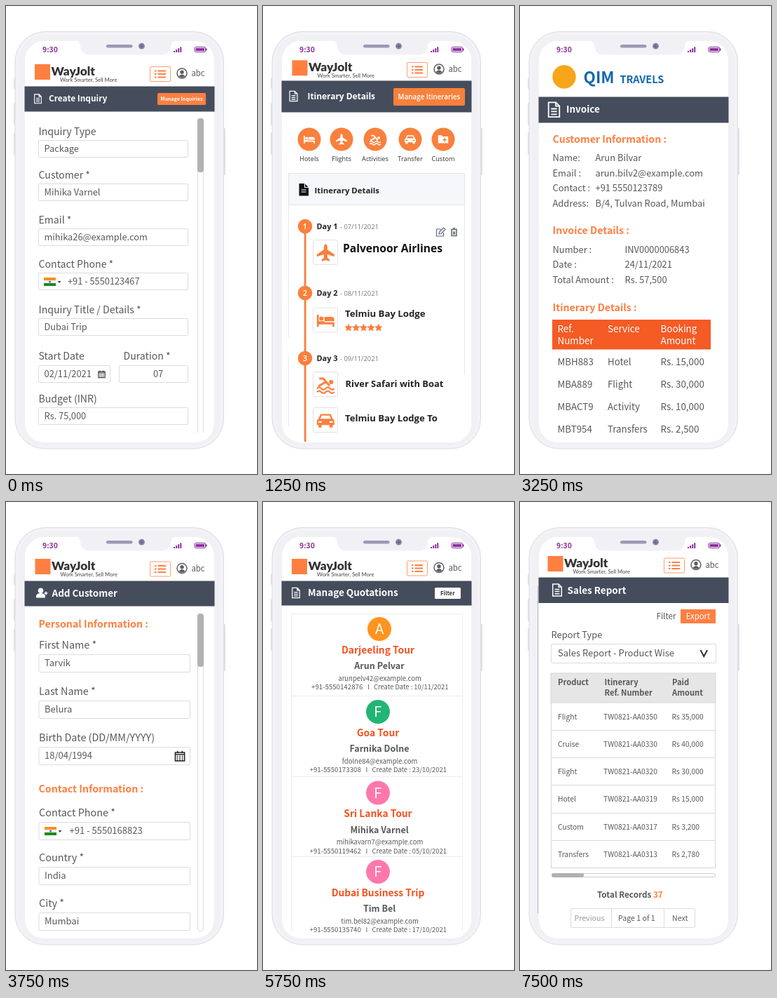
An HTML page that plays this animation: 358 px wide and 667 px high, repeating every 8.75 s.

```html
<!DOCTYPE html>
<html lang="en">
<head>
<meta charset="utf-8">
<title>Travel app screens</title>
<style>
html, body { margin: 0; width: 100%; height: 100%; overflow: hidden; background: #fff; }
svg { display: block; width: 358px; height: 667px; }
text { font-family: "Noto Sans CJK JP", "Noto Sans CJK SC", "Noto Sans", sans-serif; white-space: pre; }
.open { font-family: "Open Sans", "Noto Sans", sans-serif; }
.lato { font-family: Lato, sans-serif; }
.robo { font-family: Roboto, sans-serif; }
</style>
</head>
<body>
<svg id="stage" viewBox="0 0 358 667" xmlns="http://www.w3.org/2000/svg"></svg>
<script>
const ORANGE = '#ff7f41', DARK = '#454d5c', INK = '#58585a', LINE = '#dcdcdc';
const STEP = 1250;

// drawing helpers
const text = (x, y, s, size, o = {}) =>
  `<text x="${x}" y="${y}" font-size="${size}" fill="${o.fill || INK}" font-weight="${o.w || 400}"` +
  ` text-anchor="${o.mid ? 'middle' : 'start'}" class="${o.font || ''}">${s}</text>`;
const rect = (x, y, x2, y2, fill, stroke = 'none', r = 0) =>
  `<rect x="${x}" y="${y}" width="${x2 - x}" height="${y2 - y}" rx="${r}" fill="${fill}" stroke="${stroke}"/>`;
const frame = (x, y, x2, y2, stroke = LINE, r = 1.5) => rect(x + .5, y + .5, x2 - .5, y2 - .5, '#fff', stroke, r);
const dot = (x, y, r, fill) => `<circle cx="${x}" cy="${y}" r="${r}" fill="${fill}"/>`;
const path = (d, stroke, w = 1, fill = 'none') =>
  `<path d="${d}" fill="${fill}" stroke="${stroke}" stroke-width="${w}" fill-rule="evenodd"/>`;
const at = (x, y, s, body) => `<g transform="translate(${x} ${y}) scale(${s})">${body}</g>`;
const each = (list, fn) => list.map(fn).join('');
const white = (w = 400, more) => ({ fill: '#fff', w, ...more });

const icons = {
  bed: c => path('M-11-7h2.4v8h19.6v7h-2.4v-3h-17.2v3h-2.4zM-1.5-4.5h8.5q4 0 4 4v3h-12.5z', 'none', 0, c) + dot(-5.2, -2.2, 2.7, c),
  plane: c => path('M0-11q2.2 1 2.2 4v3.3l8.8 6v2.7l-8.8-2.8v4.3l2.8 2.3v2L0 9.5l-5 1.3v-2l2.8-2.3V2.2l-8.8 2.8V2.3l8.8-6V-7q0-3 2.2-4z', 'none', 0, c),
  swim: c => dot(7, -3, 2.7, c) + path('M-8-7.5H-3L5 1.5M-9 2L0-3', c, 2.6) +
    path('M-11 5q2.75-3 5.5 0t5.5 0 5.5 0 5.5 0M-11 9.5q2.75-3 5.5 0t5.5 0 5.5 0 5.5 0', c, 2),
  car: c => path('M-11 0l2-2 2.5-6h13l2.5 6 2 2v6h-2v3h-4v-3h-10v3h-4v-3h-2zM-5-6h10l1.7 4h-13.4zM-9 1h4v2h-4zM5 1h4v2h-4z', 'none', 0, c),
  folder: c => path('M-10-8h7l2 2.5h11v13h-20zM2-3h2v3h3v2h-3v3h-2v-3h-3v-2h3z', 'none', 0, c),
  doc: c => path('M-6-8h8l4 4V8h-12zM2-8v4h4M-3.2-1h6.4M-3.2 2h6.4M-3.2 5h6.4', c, 1.4),
  person: c => dot(0, -4, 4, c) + path('M-7 7v-2q0-5 7-5t7 5v2z', 'none', 0, c),
  cal: c => path('M-6-5h12v11h-12zM-6-2.5h12M-3-7v3M3-7v3', c, 1.4) +
    `<g stroke-dasharray="1.6 1.6">${path('M-4 0h8M-4 2.2h8M-4 4.4h8', c, 1.3)}</g>`,
  star: c => path('M0-5.6l1.7 3.6 3.9.5-2.9 2.7.8 4L0 3.3l-3.5 1.9.8-4-2.9-2.7 3.9-.5z', 'none', 0, c)
};
const icon = (name, x, y, s = 1, c = '#fff') => at(x, y, s, icons[name](c));

// shared parts
const header = (x, nameY, btnY) =>
  rect(x, nameY - 10, x + 22, nameY + 12, ORANGE) +
  text(x + 23.5, nameY + 6, 'WayJolt', 17.3, { font: 'lato', w: 900, fill: '#333' }) +
  text(x + 36, nameY + 14.5, 'Work Smarter, Sell More', 7.6, { font: 'lato', fill: '#444' }) +
  frame(205, btnY - 11, 235, btnY + 11, '#ff9d6e') +
  each([-4.5, 0, 4.5], d => rect(212, btnY + d - 1, 214.5, btnY + d + 1, ORANGE) +
    rect(216.5, btnY + d - 1, 228, btnY + d + 1, ORANGE)) +
  at(251, btnY - 1, 1, dot(0, 0, 7.7, '#5c5c62') + dot(0, 0, 6.2, '#fff') + dot(0, -1.8, 2.7, '#5c5c62') +
    path('M-4.6 4Q0-1 4.6 4Q0 8 -4.6 4z', 'none', 0, '#5c5c62')) +
  text(264.5, btnY + 3, 'abc', 11.3);
const band = (y, y2) => rect(26.5, y + .5, 297.5, y2 + .5, DARK);
const bar = (y, y2, x, base, title, size) => band(y, y2) + text(x, base, title, size, white(600));
const field = (x, x2, y, value, size, h = 25) =>
  frame(x, y, x2, y + h) + text(x + 8.5, y + h / 2 + 4.3, value, size);
const heading = (y, s) => text(46.5, y, s, 14.2, { fill: ORANGE, w: 600 });
const flag = (x, y) => rect(x, y, x + 17, y + 4, '#ff8f1f') + rect(x, y + 4, x + 17, y + 8, '#f2f2f2') +
  rect(x, y + 8, x + 17, y + 12, '#1b8a1e') + dot(x + 8.5, y + 6, 1.5, '#5566aa') +
  path(`M${x + 19.5} ${y + 5}h5l-2.5 3z`, 'none', 0, '#444');
const vScroll = (y, y2, thumb) =>
  rect(273.5, y + .5, 281.5, y2, '#fff', LINE, 4) + rect(273, y, 282, thumb, '#b1b1b1', 'none', 4);
const hScroll = (x, y) =>
  rect(x + .5, y, x + 234, y + 5, '#fff', '#ccc', 2.5) + rect(x, y - .5, x + 46, y + 5.5, '#b1b1b1', 'none', 3);
const pager = (x, y, h) =>
  frame(x, y, x + 178, y + h) + path(`M${x + 58.5} ${y}v${h}M${x + 133.5} ${y}v${h}`, LINE) +
  text(x + 5.5, y + h / 2 + 4, 'Previous', 10.6, { fill: '#999' }) +
  text(x + 68, y + h / 2 + 4, 'Page 1 of 1', 10.6) + text(x + 145, y + h / 2 + 4, 'Next', 10.6);
const grid = (x, x2, ys) =>
  frame(x, ys[0], x2, ys[ys.length - 1] + 1, '#d6d6d6', 0) +
  rect(x, ys[0], x2, ys[1], '#e6e6e6', '#d6d6d6') +
  each(ys.slice(2, -1), y => path(`M${x} ${y}.5H${x2}`, '#d9d9d9'));
const heads = (xs, y, lines, dy) =>
  each(lines, ([a, b], i) => text(xs[i], y, a, 11.2, { w: 600 }) + text(xs[i], y + dy, b, 11.2, { w: 600 }));

function inquiry() {
  const label = (x, y, s) => text(x, y, s, 14.1);
  return header(41, 93, 97) + bar(114, 150, 61, 136.2, 'Create Inquiry', 11.9) +
    icon('doc', 45.5, 132.3, .8) + rect(216, 124, 285, 141, ORANGE, 'none', 1.5) +
    text(250.5, 135, 'Manage Inquiries', 7.1, white(600, { mid: 1 })) +
    each([['Inquiry Type', 191, 'Package'], ['Customer *', 253, 'Mihika Varnel'],
      ['Email *', 317, 'mihika26@example.com'], ['Contact Phone *', 380, ''],
      ['Inquiry Title / Details *', 445, 'Dubai Trip'], ['Budget (INR)', 572, 'Rs. 75,000']],
      ([l, y, v]) => label(46.5, y - 7.3, l) + field(46, 260, y, v, 12.8)) +
    flag(54, 387) + text(88, 397, '+91 - 5550123467', 12.8) +
    label(46.5, 504, 'Start Date') + label(167.5, 504, 'Duration *') +
    field(46, 149, 512, '02/11/2021', 12.9) + icon('cal', 136.5, 525, .78, '#333') +
    field(161, 260, 512, '', 12.8) + text(210, 528.8, '07', 12.8) +
    vScroll(160, 615, 237) + rect(270, 608, 286, 618, '#fff');
}

function itinerary() {
  const o = (w, fill = '#222', mid) => ({ font: 'open', w, fill, mid });
  const orange = '#f9803d';
  const tile = (name, y, x2 = 107) => frame(71, y, x2, y + 36, '#e2e2e6', 2) + icon(name, 89.3, y + 18.5, 1.13, orange);
  return header(41.5, 87.3, 91) + band(106, 151) + icon('doc', 43.5, 128.5, .9) +
    text(63.5, 133, 'Itinerary Details', 11.9, o(700, '#fff')) +
    rect(186, 117, 288, 142, orange, 'none', 2) + text(237, 133.4, 'Manage Itineraries', 9.8, o(600, '#fff', 1)) +
    each([['bed', 66, 'Hotels'], ['plane', 112, 'Flights'], ['swim', 160, 'Activities'], ['car', 210, 'Transfer'], ['folder', 257, 'Custom']],
      ([n, x, s]) => dot(x, 190, 16.5, orange) + icon(n, x, 190, .72) + text(x, 220.8, s, 9.2, o(500, '#333', 1))) +
    rect(36.5, 238.5, 287.5, 283.5, '#f6f7fa', '#e2e5eb') + path('M36.5 283V472M36.5 498V600M287.5 283V526', '#e8eaef') +
    path('M51.5 253h8l5.5 5.5v12h-13.5z', 'none', 0, '#111') + path('M54.5 262h7M54.5 265h7M59.5 253v5.5h5.5', '#fff', 1.1) +
    text(73.5, 266.7, 'Itinerary Details', 11.4, o(700)) +
    rect(58.7, 314, 61.5, 621, orange) +
    each([[1, 314, '07'], [2, 409, '08'], [3, 502, '09']], ([n, y, d]) =>
      dot(60, y, 10.3, orange) + text(60, y + 4, n, 11, o(600, '#fff', 1)) +
      text(76.5, y + 4.2, 'Day ' + n, 10.9, o(700)) + text(110, y + 4, `- ${d}/11/2021`, 9.3, o(400, '#777'))) +
    tile('plane', 333) + tile('bed', 429.5) + tile('swim', 521) + tile('car', 572) +
    text(114, 350.6, 'Palvenoor Airlines', 15.6, o(700, '#111')) +
    text(117, 443, 'Telmiu Bay Lodge', 13.2, o(700)) +
    text(117.5, 543, 'River Safari with Boat', 12.9, o(700)) +
    text(117, 592, 'Telmiu Bay Lodge To', 13.1, o(700)) +
    each([0, 1, 2, 3, 4], i => icon('star', 122 + i * 10.7, 458.3, 1, orange)) +
    path('M254 318h-6.5v10h10v-5M251 325l.5-3 6-6 2.5 2.5-6 6z', '#5f6772', 1.2) +
    path('M268 318.5h9M271 316.8h3M269 319v8.5h7v-8.5M271 321.5l3 4M274 321.5l-3 4', '#5f6772', 1.5);
}

function invoice() {
  const blue = '#1268b0', rows = (x, list) => each(list, ([y, a, b]) => text(46.5, y, a, 12.9) + text(x, y, b, 12.9));
  return dot(63, 101, 16.7, '#f8a51b') + text(90.5, 110.2, 'QIM', 22.6, { fill: blue, w: 700 }) +
    text(142.5, 110.2, 'TRAVELS', 14.5, { fill: blue, w: 600 }) +
    bar(129, 166, 66, 152.3, 'Invoice', 13.5) + icon('doc', 48.5, 147.8, 1.3) +
    heading(195, 'Customer Information :') +
    rows(107.5, [[221, 'Name:', 'Arun Bilvar'], [242.7, 'Email :', 'arun.bilv2@example.com'],
      [264.3, 'Contact :', '+91 5550123789'], [286, 'Address:', 'B/4, Tulvan Road, Mumbai']]) +
    heading(324.7, 'Invoice Details :') +
    rows(149.5, [[351.7, 'Number :', 'INV0000006843'], [373.3, 'Date :', '24/11/2021'], [394.8, 'Total Amount :', 'Rs. 57,500']]) +
    heading(435, 'Itinerary Details :') + rect(46, 447, 272, 489.5, '#f45b25') +
    each([[53.5, 'Ref.', 'Number'], [125, 'Service', ''], [200.5, 'Booking', 'Amount']],
      ([x, a, b]) => text(x, 464.5, a, 13.4, white()) + text(x, 481.5, b, 13.4, white())) +
    each([['MBH883', 'Hotel', '15,000'], ['MBA889', 'Flight', '30,000'], ['MBACT9', 'Activity', '10,000'], ['MBT954', 'Transfers', '2,500']],
      ([a, b, c], i) => text(53.5, 511.7 + i * 32, a, 13.3) + text(125, 511.7 + i * 32, b, 13.3) +
        text(200.5, 511.7 + i * 32, 'Rs. ' + c, 13.4));
}

function customer() {
  return header(41.5, 91, 95.5) + bar(112, 148, 65.5, 135.2, 'Add Customer', 13.5) +
    icon('person', 49.5, 130, .93) + path('M54.5 130h5M57 127.5v5', '#fff', 1.4) +
    heading(178.5, 'Personal Information :') + heading(413.7, 'Contact Information :') +
    each([['First Name *', 217, 'Tarvik'], ['Last Name *', 283, 'Belura'], ['Birth Date (DD/MM/YYYY)', 349, '18/04/1994'],
      ['Contact Phone *', 456, ''], ['Country *', 520, 'India'], ['City *', 585, 'Mumbai']],
      ([l, y, v]) => text(47, y - 8, l, 14.4) + field(46.5, 263, y, v, 13, 26)) +
    icon('cal', 248, 362.5, 1.1, '#222') + flag(55, 463) + text(90.5, 473.3, '+91 - 5550168823', 13) +
    vScroll(159, 612, 235);
}

function quotations() {
  const card = (y, x, cy, color, letter, tour, who, mail, phone, px, date) =>
    path(`M40 ${y}.5H285`, '#ececec') + dot(x, cy, 17, color) +
    text(x, cy + 7, letter, 19.5, white(400, { mid: 1, font: 'robo' })) +
    text(164, cy + 34.7, tour, 13.8, { fill: '#f4511e', w: 600, mid: 1 }) +
    text(166, cy + 57.3, who, 12.5, { w: 600, mid: 1 }) + text(166.5, cy + 73.5, mail, 9.5, { mid: 1 }) +
    text(px, cy + 86, phone, 9.7) + text(px + 80, cy + 86, 'I', 9.5) +
    text(px + 89, cy + 86, `Create Date : ${date}/2021`, 9.4);
  return header(41, 91, 94.5) + bar(112, 147, 64, 134, 'Manage Quotations', 13.5) +
    icon('doc', 47, 129.5, .88) + rect(245, 122, 282, 138, '#fff', 'none', 1.5) +
    text(263.3, 132.7, 'Filter', 7.9, { w: 600, mid: 1, fill: '#333' }) +
    path('M40.5 159V612M284.5 159V612', '#ececec') +
    card(159, 166, 181, '#ff941f', 'A', 'Darjeeling Tour', 'Arun Pelvar', 'arunpelv42@example.com', '+91-5550142876', 69, '10/11') +
    card(276, 164, 299, '#22b573', 'F', 'Goa Tour', 'Farnika Dolne', 'fdolne84@example.com', '+91-5550173308', 66.5, '23/10') +
    card(391, 164, 414.5, '#ff78ac', 'F', 'Sri Lanka Tour', 'Mihika Varnel', 'mihikavarn7@example.com', '+91-5550119462', 66.5, '05/10') +
    card(505, 164, 527, '#ff78ac', 'F', 'Dubai Business Trip', 'Tim Bel', 'tim.bel82@example.com', '+91-5550135740', 66.5, '17/10');
}

function reconcile() {
  const grey = '#7d7d7d', cols = [77.5, 145, 215];
  const check = y => rect(53.5, y + .5, 65.5, y + 12.5, '#f0f0f0', '#c2c2c2', 1);
  return header(41.5, 91.7, 95.5) + bar(112, 149, 67, 135.3, 'Customer Reconciliation', 11.8) +
    path('M41 126l4-2 1 2 4-2 1 2 8-2v13l-13 3-5-12z', 'none', 0, '#fff') + icon('star', 52.5, 132.5, .75, DARK) +
    path('M44 126l4 13', DARK, 1) +
    path('M93 177.5H150', ORANGE, 2) + path('M162 177.5H231', grey, 2) +
    each([[93, 94, 'Select', 'Customer', ORANGE], [162, 161.5, 'Select', 'Invoice', grey], [231, 234, 'Payment', 'Information', grey]],
      ([x, tx, a, b, c], i) => dot(x, 177, 13.2, c) + text(x, 182.3, i + 1, 14.5, white(600, { mid: 1 })) +
        text(tx, 210, a, 12.9, { mid: 1 }) + text(tx, 227, b, 12.9, { mid: 1 })) +
    text(47, 269.7, 'Customer Selection', 14.5) +
    frame(45, 276, 279, 304) + rect(45, 276, 73, 304, '#c6c6c6') + icon('person', 59, 290, .85, '#58585a') +
    rect(232, 276, 279, 304, ORANGE) + text(255.3, 294.5, 'Select', 12.1, white(400, { mid: 1 })) +
    rect(45, 327, 135.5, 350, '#0b61cf') + rect(135.5, 327, 211, 350, grey) +
    text(50, 342.5, 'Pay by Invoices', 11.2, white()) + text(140, 342.5, 'Pay by BRNs', 11.2, white()) +
    text(47, 366.3, 'Please select at least one record to pay.', 10.2, { w: 600 }) +
    grid(45, 279, [390, 433, 472, 511, 549]) + check(404) +
    heads(cols, 407.5, [['Customer', 'Name'], ['Date of', 'Booking'], ['Invoice', 'Number']], 15.5) +
    each([['Nilvitha', 'Dovel', '08/10', 'MBCT886'], ['Arun', 'Bilvar', '11/09', 'MDCR844'], ['Jivel', 'Moor', '23/08', 'MWFR723']],
      ([a, b, d, n], i) => at(0, i * 38.9, 1, check(446) + text(cols[0], 449.7, a, 10.6) + text(cols[0], 463.8, b, 10.6) +
        text(cols[1], 449.7, d + '/2021', 10.6) + text(cols[2], 449.7, n, 10.6))) +
    hScroll(46, 562) + pager(72, 586, 28);
}

function report() {
  const cols = [54, 120.5, 217];
  return header(39.5, 87, 90.5) + bar(107, 143.5, 67.5, 131.2, 'Sales Report', 13.5) +
    path('M25.5 120V586', '#b9b9bd') + icon('doc', 53, 125.5, 1.05) +
    text(194.5, 167, 'Filter', 11.6) + rect(229, 153, 279, 173, ORANGE) +
    text(254, 167.2, 'Export', 11.4, white(400, { mid: 1 })) +
    text(44.5, 193.6, 'Report Type', 12.9) + frame(44, 202, 280, 230) +
    text(54, 220, 'Sales Report - Product Wise', 13) + path('M257.5 211l4.8 9 4.8-9', '#333', 2) +
    grid(44, 279, [244, 286, 325, 364, 403, 443, 482, 521]) +
    heads(cols, 260.7, [['Product', ''], ['Itinerary', 'Ref. Number'], ['Paid', 'Amount']], 15.3) +
    each([['Flight', 50, '35,000'], ['Cruise', 30, '40,000'], ['Flight', 20, '30,000'], ['Hotel', 19, '15,000'], ['Custom', 17, '3,200'], ['Transfers', 13, '2,780']],
      ([p, n, v], i) => at(0, i * 39.2, 1, text(54, 309.8, p, 10.3) + text(119, 309.8, 'TW0821-AA03' + n, 10.3) +
        text(216.5, 309.8, 'Rs ' + v, 10.3))) +
    hScroll(45, 529.5) + text(110, 563.5, `Total Records <tspan fill="${ORANGE}">37</tspan>`, 11.7, { w: 600 }) +
    pager(72, 579, 28);
}

function phone() {
  const purple = '#8b2f9b', shell = '#f1f1f5';
  return each([[11, 102, 118], [11, 138, 170], [11, 180, 212], [309, 174, 241]], ([x, y, y2]) => rect(x, y, x + 4, y2, '#e0e0e6', 'none', 1.5)) +
    rect(13, 36.5, 310.5, 631, shell, '#dcdce2', 43) + rect(16, 39.5, 307.5, 628, shell, '#f7f7fa', 40) +
    rect(27, 50, 297, 622, '#fff', 'none', 27) +
    path('M98 49.5q7 0 8 7q1 13 13 13H222q12 0 13-13q1-7 8-7z', 'none', 0, shell) +
    rect(143, 55, 180.5, 59.5, '#9b99b4', 'none', 2.2) + dot(193.5, 57.2, 4.4, '#8583a3') + dot(193.5, 57.2, 2, '#6a688c') +
    text(52, 66, '9:30', 10.4, { fill: purple, w: 600 }) +
    each([0, 1, 2, 3], i => rect(239 + i * 3.1, 64 - i * 1.9, 241 + i * 3.1, 66, purple)) +
    rect(269, 58.5, 284.5, 65.5, '#fff', purple, 1.5) + rect(270.5, 60, 283, 64, purple) + rect(285, 60.5, 286.5, 63.5, purple);
}

const screens = [inquiry, itinerary, invoice, customer, quotations, reconcile, report];
const stage = document.getElementById('stage');
stage.innerHTML = phone() +
  '<clipPath id="view"><path d="M24 70H298V595Q298 622 270 622H54Q27 622 24 595z"/></clipPath>' +
  each(screens, draw => `<g class="screen" clip-path="url(#view)">${draw()}</g>`);

// each screen is shown for one step, with hard cuts
const total = STEP * screens.length, cut = 1 / screens.length;
stage.querySelectorAll('.screen').forEach((g, i) => g.animate(
  [{ opacity: 1 }, { opacity: 1, offset: cut }, { opacity: 0, offset: cut }, { opacity: 0 }],
  { duration: total, delay: i * STEP - total, iterations: Infinity }));
</script>
</body>
</html>
```
